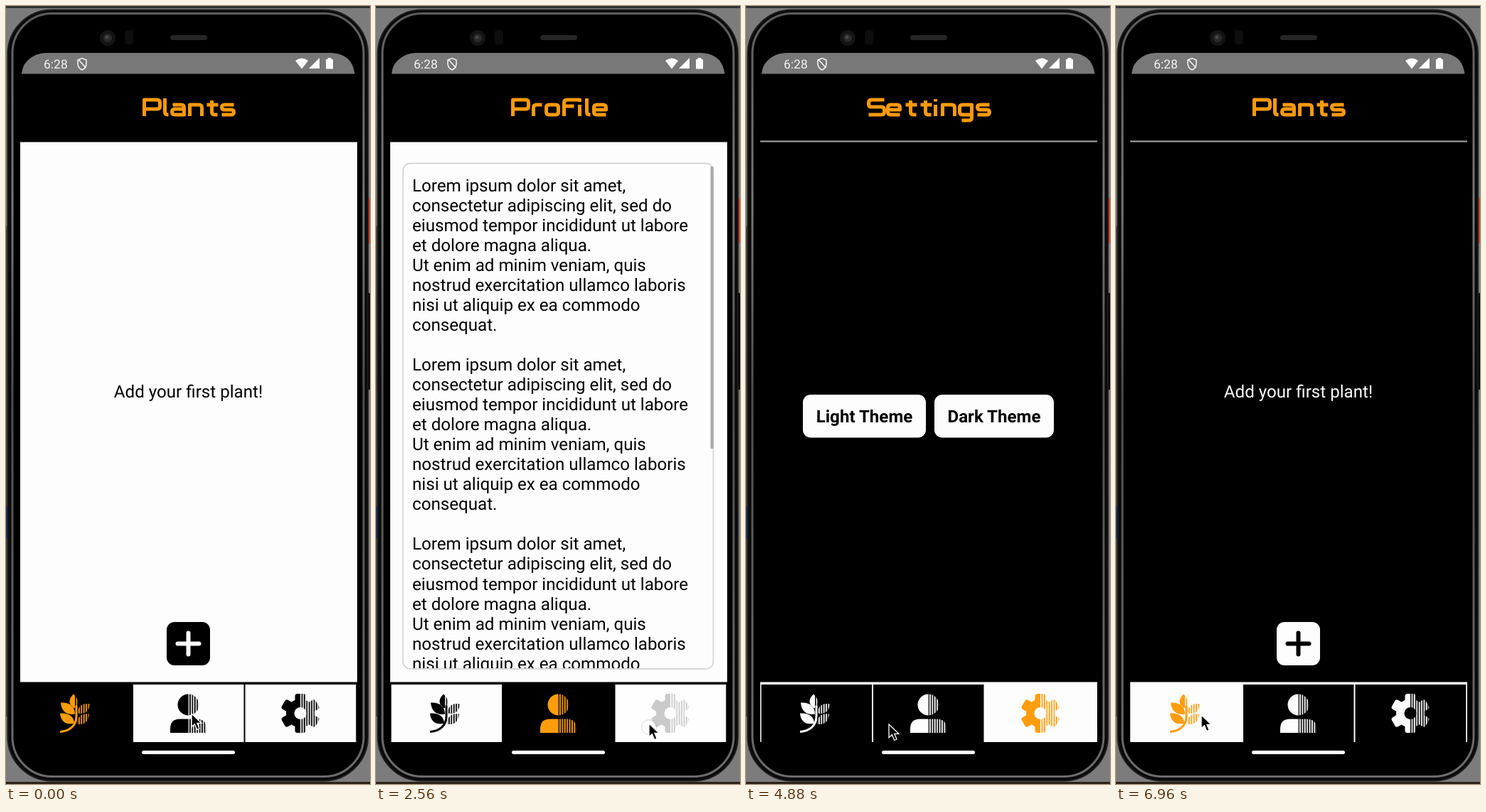
Animation of 512 by 1095 pixels, one loop 7.04 s. Source, as an HTML page:

```html
<!DOCTYPE html>
<html lang="en">
<head>
<meta charset="utf-8">
<title>Plant app demo</title>
<style>
  html, body { margin: 0; width: 100%; height: 100%; overflow: hidden; background: #7c7c7c; }
  svg { display: block; width: 100vw; height: 100vh; }
  text { font-family: Roboto, sans-serif; font-size: 24.15px; text-rendering: geometricPrecision; }
  #app { --fg: #000; --bg: #fdfdfd; --line: #000; --box: #ccc; }
  #app.dark { --fg: #fdfdfd; --bg: #000; --line: #aaa; --box: #999; }
  .fg { fill: var(--fg); }
  .bg { fill: var(--bg); }
  .center { text-anchor: middle; }
  .bold { font-weight: 700; }
  .page { display: none; }
  .page.on { display: inline; }
  .title { fill: none; stroke: #fa9a0c; stroke-width: 5; stroke-linejoin: round; }
  .dark #scrollbar { display: none; }
  .tab { --tab: var(--bg); --icon: var(--fg); }
  .tab.on { --tab: var(--fg); --icon: #ff9d0c; }
  .tab > rect { fill: var(--tab); }
  .icon { fill: var(--icon); stroke: none; }
  .stem { fill: none; stroke: var(--icon); stroke-width: 3; }
</style>
</head>
<body>
<svg viewBox="0 0 512 1095" preserveAspectRatio="none">
  <defs>
    <linearGradient id="rim" x1="0" y1="0" x2="0" y2="1">
      <stop offset="0" stop-color="#5c5c5c"/>
      <stop offset=".25" stop-color="#777"/>
      <stop offset=".5" stop-color="#4c4c4c"/>
      <stop offset="1" stop-color="#6c6c6c"/>
    </linearGradient>
    <clipPath id="screen"><rect x="20" y="66" width="474" height="1003" rx="36"/></clipPath>
    <clipPath id="textClip"><rect x="39" y="222" width="434" height="710"/></clipPath>
    <pattern id="stripes" width="3.4" height="10" patternUnits="userSpaceOnUse">
      <rect x="1.5" width="1.8" height="10" fill="#fff"/>
    </pattern>
    <mask id="half" maskUnits="userSpaceOnUse" x="-32" y="-32" width="64" height="64">
      <rect x="-32" y="-32" width="32" height="64" fill="#fff"/>
      <rect y="-32" width="32" height="64" fill="url(#stripes)"/>
    </mask>
    <mask id="ring" maskUnits="userSpaceOnUse" x="-32" y="-32" width="64" height="64">
      <rect x="-32" y="-32" width="64" height="64" fill="#fff"/>
      <circle r="8.5"/>
    </mask>
  </defs>

  <!-- Desktop behind the device -->
  <rect width="512" height="1095" fill="#7c7c7c"/>
  <path d="M0 0H512V3H0Z" fill="#333"/>
  <path d="M0 1092H512V1095H0Z" fill="#2c2314"/>
  <path d="M507 270H512V334H507Z" fill="#c4432a"/>
  <path d="M507 404H512V540H507Z" fill="#050505"/>
  <path d="M0 310H4V1000H0Z" fill="#4a4a4a"/>
  <path d="M0 704H4V750H0Z" fill="#26346e"/>

  <!-- Device -->
  <g fill="none">
    <rect x="2.5" y="5.5" width="506.5" height="1085" rx="62" fill="#0a0a0a" stroke="#1c1c1c" stroke-width="2"/>
    <rect x="9" y="10.5" width="494" height="1074" rx="56" fill="#000" stroke="url(#rim)" stroke-width="3"/>
  </g>
  <circle cx="143" cy="45" r="11" fill="#141414"/>
  <circle cx="143" cy="45" r="6" fill="#292929"/>
  <circle cx="142" cy="44" r="2.5" fill="#484848"/>
  <rect x="167" y="34" width="12" height="20" rx="3" fill="#0d0d0d"/>
  <rect x="231" y="41" width="52" height="7" rx="3.5" fill="#252525"/>

  <g id="app" clip-path="url(#screen)">
    <rect x="20" y="66" width="474" height="1003"/>
    <path d="M22 95.5C24 78 34 66 52 66H460C478 66 488 78 490.5 95.5Z" fill="#787878"/>
    <g fill="#fff">
      <text x="53" y="88" fill="#f2f2f2" style="font-size:17.5px">6:28</text>
      <path d="M101 76L107 73.5L113 76V81Q113 87 107 90Q101 87 101 81ZM101.5 75L112.5 87" fill="none" stroke="#f2f2f2" stroke-width="1.6"/>
      <path d="M407 77Q416 70 425 77L416 88.5Z"/>
      <path d="M441 73V88H426Z"/>
      <path d="M452.5 73H457.5V75H460V88.5H450V75H452.5Z"/>
    </g>

    <rect class="bg" x="20" y="191" width="474" height="845"/>
    <rect x="20" y="189.5" width="474" height="2" fill="var(--line)"/>

    <g class="page">
      <g class="title" data-word="Plants" data-x="194.5"></g>
      <text class="fg center" x="256.5" y="551">Add your first plant!</text>
      <rect class="fg" x="226" y="867" width="61" height="61" rx="11"/>
      <path d="M241.5 897.5H271.5M256.5 882.5V912.5" stroke="var(--bg)" stroke-width="6" stroke-linecap="round"/>
    </g>

    <g class="page">
      <g class="title" data-word="Profile" data-x="192.5"></g>
      <rect x="38" y="221.5" width="436.5" height="711.5" rx="10" fill="none" stroke="var(--box)" stroke-width="1.4"/>
      <g id="prose" class="fg" clip-path="url(#textClip)"></g>
      <rect id="scrollbar" x="470.5" y="226" width="4" height="397" fill="#a9a9a9"/>
    </g>

    <g class="page">
      <g class="title" data-word="Settings" data-x="172.5"></g>
      <rect class="fg" x="80" y="547" width="173" height="60.5" rx="11"/>
      <text class="bg center bold" x="166.5" y="586">Light Theme</text>
      <g id="darkButton">
        <rect class="fg" x="265" y="547" width="168" height="60.5" rx="11"/>
        <text class="bg center bold" x="349" y="586">Dark Theme</text>
      </g>
    </g>

    <g class="tab">
      <rect x="20" y="953" width="158" height="83"/>
      <g class="icon" transform="translate(97 995.5)">
        <g mask="url(#half)">
          <path d="M-2 -27C-10 -20 -9 -12 -1 -7C6 -12 6 -20 -2 -27ZM-20 -15C-7 -16 0 -9 0 1C-12 3 -19 -3 -20 -15ZM-21 0C-8 -1 -1 5 -1 14C-12 17 -20 12 -21 0ZM21 -13C9 -15 4 -9 4 0C14 2 20 -3 21 -13ZM20 1C8 -1 3 6 3 15C13 17 19 12 20 1Z"/>
        </g>
        <path class="stem" d="M-21 26C-8 25 2 18 2 4V-11"/>
      </g>
    </g>
    <g class="tab">
      <rect x="178" y="953" width="157.5" height="83"/>
      <g class="icon" transform="translate(256.5 995.5)">
        <g mask="url(#half)">
          <circle cy="-12" r="15"/>
          <path d="M-25.5 27.5V22Q-25.5 8 -12 8H12Q25.5 8 25.5 22V27.5Z"/>
        </g>
      </g>
    </g>
    <g class="tab">
      <rect x="335.5" y="953" width="158.5" height="83"/>
      <g class="icon" transform="translate(414 995.5)">
        <g mask="url(#half)"><g mask="url(#ring)">
          <circle r="20"/>
          <rect id="tooth" x="-7.5" y="-27.5" width="15" height="55" rx="3.5"/>
          <use href="#tooth" transform="rotate(60)"/>
          <use href="#tooth" transform="rotate(120)"/>
        </g></g>
      </g>
    </g>
    <path d="M20 953.3H494" stroke="var(--fg)" stroke-width="3.6"/>
    <path d="M20.5 953V1036M178 953V1036M335.5 953V1036M493.3 953V1036" stroke="var(--fg)" stroke-width="2"/>
    <rect x="191" y="1048" width="131" height="5" rx="2.5" fill="#fff"/>
  </g>

  <g id="cursor">
    <circle id="touch" cy="5" r="10.5" fill="#fff" fill-opacity=".5" stroke="#000" stroke-opacity=".15"/>
    <path d="M0 0V18.7L4.3 14.7L7.7 22.5L11 21L7.9 13.4H14Z" stroke="#fff" stroke-width="1.3"/>
  </g>
</svg>

<script>
const LOOP = 7040, STEP = 80;
const $ = id => document.getElementById(id);
const all = selector => [...document.querySelectorAll(selector)];

// Display lettering: [path on the baseline, advance]
const GLYPHS = {
  P: ["M0 2V-21H18Q22 -21 22 -17V-12Q22 -8 18 -8H0", 29],
  S: ["M22 -21H4Q0 -21 0 -17V-14.5Q0 -11 4 -11H18Q22 -11 22 -7V-4Q22 0 18 0H0", 27],
  l: ["M0 -23V-4Q0 0 4 0H5", 10],
  a: ["M1 -14H13Q17 -14 17 -10V0H4Q0 0 0 -4Q0 -8 4 -8H17", 25],
  n: ["M0 2V-14H13Q17 -14 17 -10V2", 24],
  t: ["M7 -20V-4Q7 0 11 0H15M0 -14H16", 21],
  s: ["M17 -14H4Q0 -14 0 -10.5Q0 -7 4 -7H13Q17 -7 17 -3.5Q17 0 13 0H0", 17],
  r: ["M0 2V-10Q0 -14 4 -14H12", 18],
  o: ["M4 -14H13Q17 -14 17 -10V-4Q17 0 13 0H4Q0 0 0 -4V-10Q0 -14 4 -14Z", 25],
  f: ["M0 2V-17Q0 -21 4 -21H22V-18M0 -12H14", 22],
  i: ["M0 -14V2M0 -22V-18.5", 10],
  e: ["M17 0H4Q0 0 0 -4V-10Q0 -14 4 -14H13Q17 -14 17 -10V-7H0", 25],
  g: ["M17 0H4Q0 0 0 -4V-10Q0 -14 4 -14H17V4Q17 8 13 8H3", 25]
};

for (const title of all(".title")) {
  let x = +title.dataset.x;
  title.setAttribute("role", "img");
  title.setAttribute("aria-label", title.dataset.word);
  title.innerHTML = [...title.dataset.word].map(letter => {
    const [path, advance] = GLYPHS[letter];
    const part = `<path transform="translate(${x} 153)" d="${path}"/>`;
    x += advance;
    return part;
  }).join("");
}

const PARAGRAPH = ["Lorem ipsum dolor sit amet,", "consectetur adipiscing elit, sed do",
  "eiusmod tempor incididunt ut labore", "et dolore magna aliqua.",
  "Ut enim ad minim veniam, quis", "nostrud exercitation ullamco laboris",
  "nisi ut aliquip ex ea commodo", "consequat.", ""];
$("prose").innerHTML = Array.from({ length: 25 }, (_, i) =>
  `<text x="51" y="${260.5 + i * 28.05}">${PARAGRAPH[i % 9]}</text>`).join("");

const pages = all(".page"), tabs = all(".tab");
const targets = [...tabs, $("darkButton")];
const DARK = 3;

// Each tap takes effect on release.
const TAPS = [
  { target: 1, down: 1200, up: 1450 },
  { target: 2, down: 2400, up: 2620 },
  { target: DARK, down: 3930, up: 4140 },
  { target: 1, down: 5000, up: 5160 },
  { target: 0, down: 6400, up: 6560 }
];

// Cursor stops: time, x, y
const PATH = [[0, 261, 996], [1400, 261, 996], [1520, 261, 993], [1840, 261, 993],
  [2320, 384, 1010], [2900, 384, 1010], [3440, 336, 628], [3680, 336, 628],
  [3840, 359, 577], [4320, 359, 577], [4880, 201, 1011], [5000, 205, 1004],
  [5520, 205, 1004], [5760, 184, 992], [6240, 120, 998], [LOOP, 120, 998]];

const clamp = v => Math.min(1, Math.max(0, v));
const ease = v => v < .5 ? 2 * v * v : 1 - 2 * (1 - v) ** 2;

function cursorAt(t) {
  const i = PATH.findIndex(stop => stop[0] > t);
  const [t0, x0, y0] = PATH[i - 1], [t1, x1, y1] = PATH[i];
  const k = ease((t - t0) / (t1 - t0));
  return [x0 + (x1 - x0) * k, y0 + (y1 - y0) * k];
}

const tapOpacity = (tap, t) => t < tap.up
  ? 1 - .8 * ease(clamp((t - tap.down) / 150))
  : .2 + .8 * ease(clamp((t - tap.up) / 250));

function render(t) {
  let page = 0, dark = false, touch = 0;
  const opacity = [1, 1, 1, 1];
  for (const tap of TAPS) {
    if (t < tap.down) break;
    opacity[tap.target] = tapOpacity(tap, t);
    touch = t < tap.up ? 1 : clamp(1 - (t - tap.up) / 140);
    if (t < tap.up) continue;
    if (tap.target === DARK) dark = true;
    else page = tap.target;
  }
  $("app").classList.toggle("dark", dark);
  pages.forEach((el, i) => el.classList.toggle("on", i === page));
  tabs.forEach((el, i) => el.classList.toggle("on", i === page));
  targets.forEach((el, i) => {
    for (const layer of el.children) layer.style.opacity = opacity[i];
  });
  $("touch").style.opacity = touch;
  $("cursor").setAttribute("transform", `translate(${cursorAt(t)})`);
}

const start = performance.now();
function frame() {
  const t = (performance.now() - start) % LOOP;
  render(Math.floor(t / STEP) * STEP);
  requestAnimationFrame(frame);
}
frame();
</script>
</body>
</html>
```
